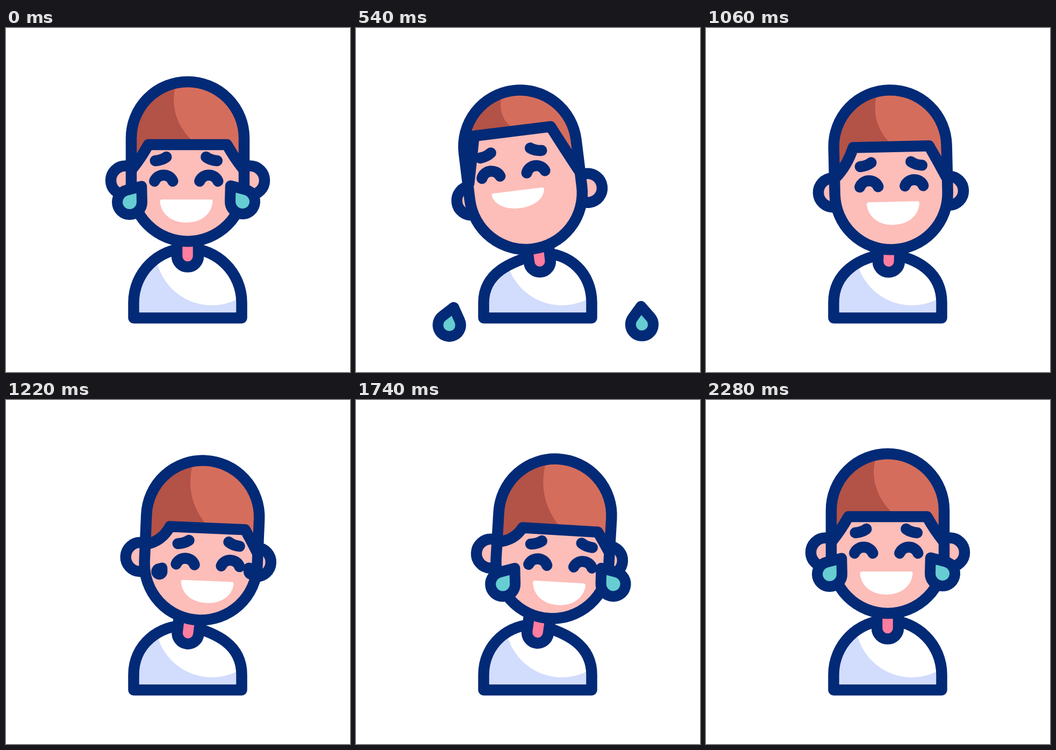
Animation, 640 px wide and 640 px high, one loop 2.4 s. Source, as an HTML page with a canvas:

```html
<!DOCTYPE html>
<html lang="en">
<head>
<meta charset="utf-8">
<title>Laughing person</title>
<style>
html, body { margin: 0; width: 100%; height: 100%; overflow: hidden; background: #fff; }
canvas { display: block; width: 640px; height: 640px; }
</style>
</head>
<body>
<canvas id="stage" width="640" height="640"></canvas>
<script>
const ctx = document.getElementById('stage').getContext('2d');
const LOOP = 2400, STEP = 20, LAST = 2280;
const NAVY = '#032a76', SKIN = '#fdbdb9', HAIR = '#d56d5d', HAIR_DARK = '#b35247';
const TEAL = '#66cdd2', PINK = '#ff7d9f', SHADE = '#d2dcfd', WHITE = '#fff';

const ramp = (t, a, b) => Math.min(1, Math.max(0, (t - a) / (b - a)));
const ease = p => p * p * (3 - 2 * p);
const move = (t, a, b) => ease(ramp(t, a, b));
const rad = deg => deg * Math.PI / 180;

// Weights of the left and right lean; at(l, r) blends offsets of the two poses.
let leftLean = 0, rightLean = 0;
const at = (l, r) => leftLean * l + rightLean * r;

// Curved part of a path: peaks midway to or from rest, and midway across.
function bend(rest, across) {
  const lean = leftLean + rightLean;
  return rest * lean * (1 - lean) + across * leftLean * rightLean;
}

function setPose(t) {
  const swing = move(t, 700, 1360);
  leftLean = move(t, 0, 700) * (1 - swing);
  rightLean = swing * (1 - move(t, 1590, 2285));
}

function paint(path, fill, stroke = true) {
  if (fill) {
    ctx.fillStyle = fill;
    ctx.fill(path);
  }
  if (stroke) ctx.stroke(path);
}

function within(path, draw) {
  ctx.save();
  ctx.clip(path);
  draw();
  ctx.restore();
}

function circle(x, y, r) {
  const p = new Path2D();
  p.arc(x, y, r, 0, Math.PI * 2);
  return p;
}

function drawBody() {
  const x = 338 + at(4.4, 0), y = 410 + at(11, 9), tilt = rad(at(-11, 11));
  const hx = 55.5 * Math.cos(tilt), hy = 55.5 * Math.sin(tilt), droop = at(7, 7);
  const body = new Path2D();
  body.moveTo(237.5, 539.5);
  body.lineTo(237.5, 511);
  body.bezierCurveTo(237.5, 455.5, x - hx, y - hy + droop, x, y);
  body.bezierCurveTo(x + hx, y + hy + droop, 438.5, 455.5, 438.5, 511);
  body.lineTo(438.5, 539.5);
  body.closePath();
  paint(body, SHADE, false);
  within(body, () => paint(circle(383, 411, 105), WHITE, false));
  paint(body);
}

function drawNeck() {
  const neck = new Path2D();
  neck.moveTo(-20, -26);
  neck.lineTo(-20, 0);
  neck.arc(0, 0, 20, Math.PI, 0, true);
  neck.lineTo(20, -26);
  ctx.save();
  ctx.translate(338 + at(4.4, 0), 424.5 + at(11, 9));
  ctx.rotate(rad(at(-8, 9)));
  paint(neck, PINK);
  ctx.restore();
}

function drawHair(skull) {
  const lx = -73 + at(-11.3, 15.8), rx = 73 + at(-14, 9.2);
  const y = -31.5 + at(-49.3, 15.5) + bend(7, 4);
  const line = new Path2D();
  line.moveTo(-103, 13.5 + at(0, -2));
  line.quadraticCurveTo(-86 + at(-7, 14.6), -8 + at(-27, 18), lx, y);
  line.lineTo(rx, y);
  line.quadraticCurveTo(86 + at(-6, 7), -8 + at(-27, 8), 103, 13.5 + at(0, 4));

  const hair = new Path2D(line);
  hair.lineTo(130, -170);
  hair.lineTo(-130, -170);
  hair.closePath();

  const dark = new Path2D();
  dark.moveTo(-23, -170);
  dark.lineTo(-23, -140);
  dark.quadraticCurveTo(-37, (y - 140) / 2 + 8, 16 + at(-21, -1), y);
  dark.lineTo(-130, y + 80);
  dark.lineTo(-130, -170);

  within(skull, () => {
    paint(hair, HAIR, false);
    within(hair, () => paint(dark, HAIR_DARK, false));
    ctx.stroke(line);
  });
}

function drawEyes() {
  ctx.save();
  ctx.translate(-2.7 + at(-18.4, 20.3), at(-35.3, 15) + bend(6, 4));
  for (const side of [-1, 1]) {
    const p = new Path2D();
    p.moveTo(side * 59, 36.5);
    p.bezierCurveTo(side * 53, 21.5, side * 31, 21.5, side * 25, 36.5);
    p.moveTo(side * 57.5, -1.5);
    p.quadraticCurveTo(side * 45, -2.5, side * 37, -8.5);
    paint(p);
  }
  ctx.restore();
}

function drawMouth(t) {
  const squash = 10 * (move(t, 0, 340) - move(t, 700, 1050))
    + 4 * (move(t, 1050, 1400) - move(t, 1580, 1740));
  const h = 43 - squash;
  const p = new Path2D();
  p.moveTo(-45, 0);
  p.lineTo(45, 0);
  p.quadraticCurveTo(49.5, 0, 49, h * 0.11);
  p.bezierCurveTo(46, h * 0.67, 26, h, 0, h);
  p.bezierCurveTo(-26, h, -46, h * 0.67, -49, h * 0.11);
  p.quadraticCurveTo(-49.5, 0, -45, 0);
  ctx.save();
  ctx.translate(-2.5 + at(-13.7, 20), 70.5 + at(-39, 10.3) + bend(3, 0));
  paint(p, WHITE, false);
  ctx.restore();
}

function drawHead(t) {
  const skull = new Path2D();
  skull.roundRect(-105, -148.5, 210, 297, 105);
  ctx.save();
  ctx.translate(338 + at(-31.6, 34), 248.5 + at(18, 11.2) + bend(-3, 5));
  ctx.rotate(rad(at(-8.1, 3.8)));
  paint(circle(-116 + at(15.8, 1), 35 + at(11.7, -0.5), 27), SKIN);
  paint(circle(116 + at(-0.8, -14.6), 35 + at(15.5, -0.5), 27), SKIN);
  paint(skull, SKIN, false);
  drawHair(skull);
  paint(skull);
  drawEyes();
  drawMouth(t);
  ctx.restore();
}

// Tear with its round end at (x, y); the angle turns its tip away from straight up.
function drawTear(x, y, angle, size) {
  const r = 23 * size, tip = 37 * size, open = Math.acos(r / tip);
  const p = new Path2D();
  p.moveTo(0, -tip);
  p.arc(0, 0, r, -Math.PI / 2 + open, Math.PI * 1.5 - open);
  p.closePath();
  ctx.save();
  ctx.translate(x, y);
  ctx.rotate(rad(angle));
  ctx.lineWidth = 20 * Math.min(1, size * 4);
  paint(p, TEAL);
  ctx.restore();
}

function drawTears(t) {
  if (t < 900) {
    const p = t / 900, e = 0.7 * ease(p) + 0.3 * p, size = 1 - 0.13 * e;
    drawTear(230 - 89 * e, 324 + 361 * e, 37 - 36 * e, size);
    drawTear(440 + 145 * e, 323 + 361 * e, -37 + 54 * e, size);
    return;
  }
  const size = move(t, 1080, 1520);
  if (size <= 0) return;
  const drop = 29.5 * size, out = 22.2 * size;
  drawTear(252.2 + at(-42, 49) - out, 294.5 + at(-8, 21) + drop, 37, size);
  drawTear(417.8 + at(-42, 43.8) + out, 293.5 + at(-8, 22) + drop, -37, size);
}

function render(t) {
  setPose(t);
  ctx.fillStyle = WHITE;
  ctx.fillRect(0, 0, 640, 640);
  ctx.strokeStyle = NAVY;
  ctx.lineWidth = 20.5;
  ctx.lineCap = ctx.lineJoin = 'round';
  drawBody();
  drawNeck();
  drawHead(t);
  drawTears(t);
}

const start = performance.now();
function tick() {
  const t = (performance.now() - start) % LOOP;
  render(Math.min(LAST, Math.floor(t / STEP) * STEP));
  requestAnimationFrame(tick);
}
tick();
</script>
</body>
</html>
```
